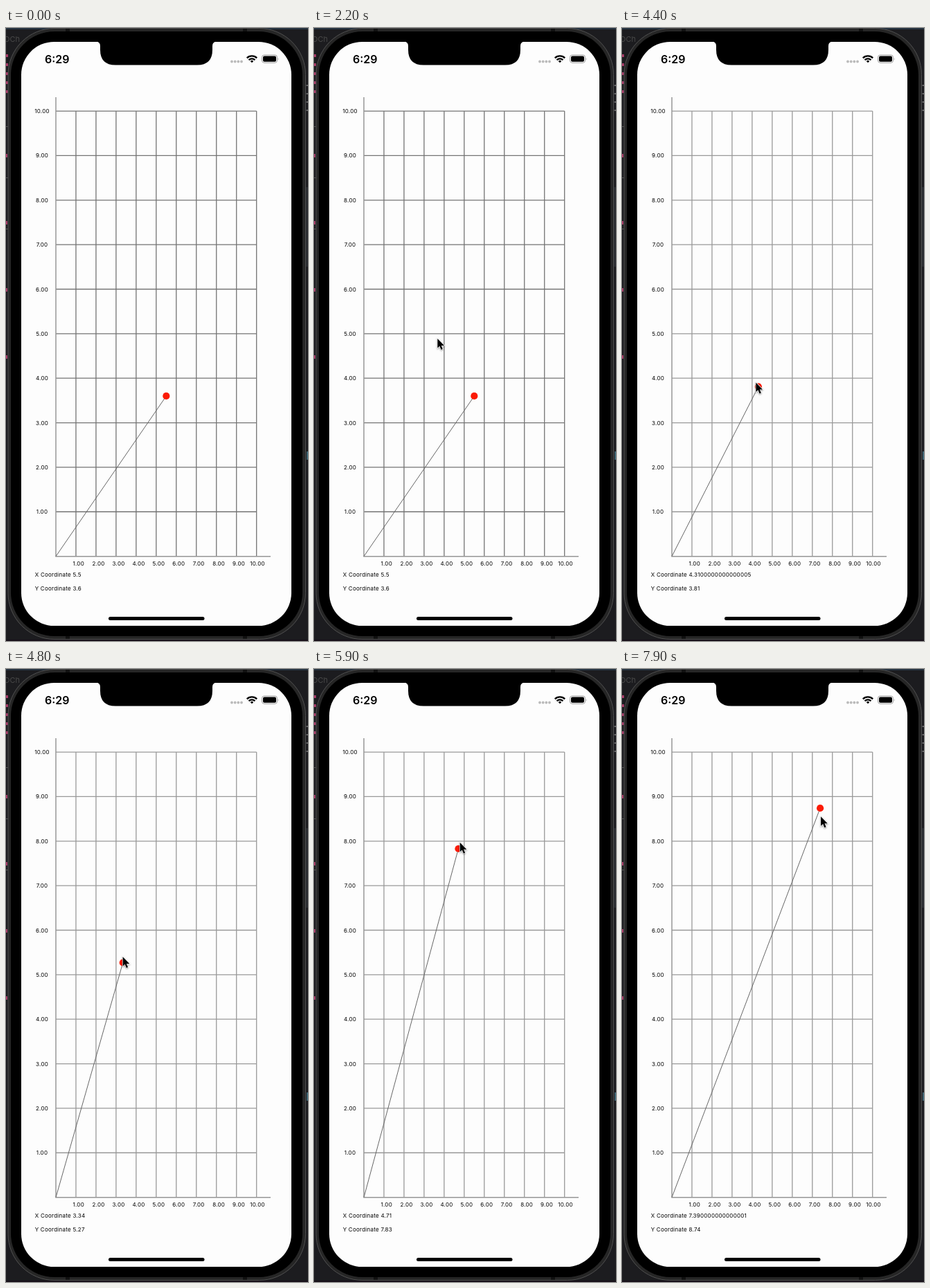
An HTML page for the animation above (8 s loop, 436 by 886 pixels).

```html
<!DOCTYPE html>
<html lang="en">
<head>
<meta charset="utf-8">
<title>Draggable point chart</title>
<style>
html, body { margin: 0; width: 100%; height: 100%; overflow: hidden; background: #1c1c1f; }
svg { display: block; width: 100vw; height: 100vh; }
text { font-family: Inter, Roboto, sans-serif; }
.label { font-size: 8px; letter-spacing: .25px; fill: #000; white-space: pre; }
</style>
</head>
<body>
<svg viewBox="0 0 436 886">
  <rect width="436" height="886" fill="#1c1c1f"/>
  <rect width="436" height="2" fill="#263340"/>
  <rect y="884" width="436" height="2" fill="#171019"/>
  <text x="-3" y="20" font-size="11" fill="#484848">OCh</text>
  <g id="code"></g>

  <rect x="3" y=".5" width="429.5" height="883" rx="67" fill="#262626" stroke="#505050"/>
  <path d="M86 1h6v4h-6zM342 1h6v4h-6zM86 879h6v4h-6zM342 879h6v4h-6z" fill="#111"/>
  <rect x="7" y="5" width="421" height="874" rx="63" fill="#000"/>
  <rect x="22" y="20" width="390" height="844" rx="47.5" fill="#fdfdfd"/>
  <path d="M130 19.5Q136 20 136 26V31.5Q136 53.5 158 53.5H276Q298 53.5 298 31.5V26Q298 20 304 19.5Z"/>

  <text x="56" y="50.5" font-size="16" font-weight="600">6:29</text>
  <g id="signal" fill="#bbb"></g>
  <g fill="none" stroke="#000" stroke-width="2.3">
    <path d="M347.8 43.4a10.2 10.2 0 0 1 14.4 0M350.5 46.2a6.4 6.4 0 0 1 9 0"/>
    <path d="M352.8 47.9 355 50.3l2.2-2.4a3.2 3.2 0 0 0-4.4 0z" fill="#000" stroke="none"/>
  </g>
  <rect x="369.5" y="39" width="22" height="11.3" rx="3.3" fill="none" stroke="#a0a0a0"/>
  <rect x="371" y="40.5" width="19" height="8.3" rx="2"/>
  <path d="M392.8 42.7q1.6 2 0 4z" fill="#a0a0a0"/>
  <rect x="148" y="851" width="138.5" height="5" rx="2.5"/>

  <path id="grid" fill="none" stroke-width="1.3"/>
  <path d="M72 100V763.8H382" fill="none" stroke="#969696" stroke-width="1.5"/>
  <g id="labels" class="label" text-anchor="middle"></g>
  <path id="ray" stroke="#666"/>
  <circle id="dot" r="5.1" fill="#fb1b05"/>
  <text id="xText" class="label" x="41.7" y="793"></text>
  <text id="yText" class="label" x="41.7" y="813"></text>

  <path id="cursor" d="M0 0V13.6L3.1 10.8 5.2 16 7.5 15 5.4 10H9.7Z" stroke="#fff"
    paint-order="stroke" stroke-width="1.3" style="filter:drop-shadow(0 1px 1px #0006)"/>
</svg>
<script>
const $ = id => document.getElementById(id);
const set = (id, attrs) => Object.entries(attrs).forEach(([k, v]) => $(id).setAttribute(k, v));
const LOOP = 8000, STEP = 100, POINTER_IN = 400, DRAG_START = 4000;
const px = x => 72 + 28.97 * x;
const py = y => 763.6 - 64.35 * y;

// [ms, x, y]: the dot in chart units
const point = [
  [3900, 5.5, 3.6], [4400, 4.3100000000000005, 3.81], [5300, 1.99, 7.3],
  [6500, 7.43, 8.36], [6900, 7.390000000000001, 8.74]
];
// [ms, dx, dy]: the pointer in pixels from the dot
const pointer = [
  [POINTER_IN, 194, 78], [1200, 2, 3], [1700, 2, 3], [2200, -53, -83], [2400, -53, -83],
  [3800, -9.5, -2], [4400, -3.5, -6], [5300, 4.5, -12], [6500, 0, -6], [7800, 0, -6], [7900, 1, 12]
];

// Smooth travel between keys, rounded to hundredths on the way
const ease = f => f * f * (3 - 2 * f);
const mix = (a, b, f) => f && a !== b ? +(a + (b - a) * ease(f)).toFixed(2) : a;
function at(keys, t) {
  const i = keys.filter(k => k[0] <= t).length;
  const a = keys[Math.max(0, i - 1)], b = keys[i] || a;
  const f = (t - a[0]) / (b[0] - a[0]);
  return [mix(a[1], b[1], f), mix(a[2], b[2], f)];
}

let grid = "", labels = "";
const label = (x, y, n) => labels += `<text x="${x}" y="${y}">${n.toFixed(2)}</text>`;
for (let i = 1; i <= 10; i++) {
  grid += `M${px(i)} 120V764M72 ${py(i)}H${px(10)}`;
  label(52, py(i) + 3, i);
  label(i < 10 ? 75.8 + 28.92 * i : 363, 777, i);
}
set("grid", { d: grid });
$("labels").innerHTML = labels;

let dots = "";
for (let i = 0; i < 4; i++) dots += `<circle cx="${326 + 4.67 * i}" cy="48.5" r="1.9"/>`;
$("signal").innerHTML = dots;

// Slivers of an editor window visible beside the phone
const bar = (x, y, w, h, c) => `<rect x="${x}" y="${y}" width="${w}" height="${h}" fill="${c}"/>`;
let code = bar(432, 230, 4, 115, "#2a2c30") + bar(434, 612, 2, 12, "#3d6472");
for (let i = 0; i < 5; i++) code += bar(0, 38 + 13 * i, 3, 4, "#a83c68");
for (let i = 0; i < 4; i++) code += bar(0, 182 + 97 * i, 2, 5, "#a83c68") + bar(433.5, 82 + 12 * i, 2.5, 2, "#666");
for (let i = 0; i < 3; i++) code += bar(0, 142 + 74 * i, 4, 1, "#555");
$("code").innerHTML = code;

function draw() {
  const t = Math.floor(performance.now() % LOOP / STEP) * STEP;
  const [x, y] = at(point, t), [dx, dy] = at(pointer, t);
  const cx = px(x), cy = py(y);
  set("grid", { stroke: t < DRAG_START ? "#747474" : "#999" });
  set("ray", { d: `M72 763.6L${cx} ${cy}` });
  set("dot", { cx, cy });
  $("xText").textContent = "X Coordinate " + x;
  $("yText").textContent = "Y Coordinate " + y;
  set("cursor", {
    transform: `translate(${cx + dx} ${cy + dy})`,
    visibility: t < POINTER_IN ? "hidden" : "visible"
  });
  requestAnimationFrame(draw);
}
draw();
</script>
</body>
</html>
```
